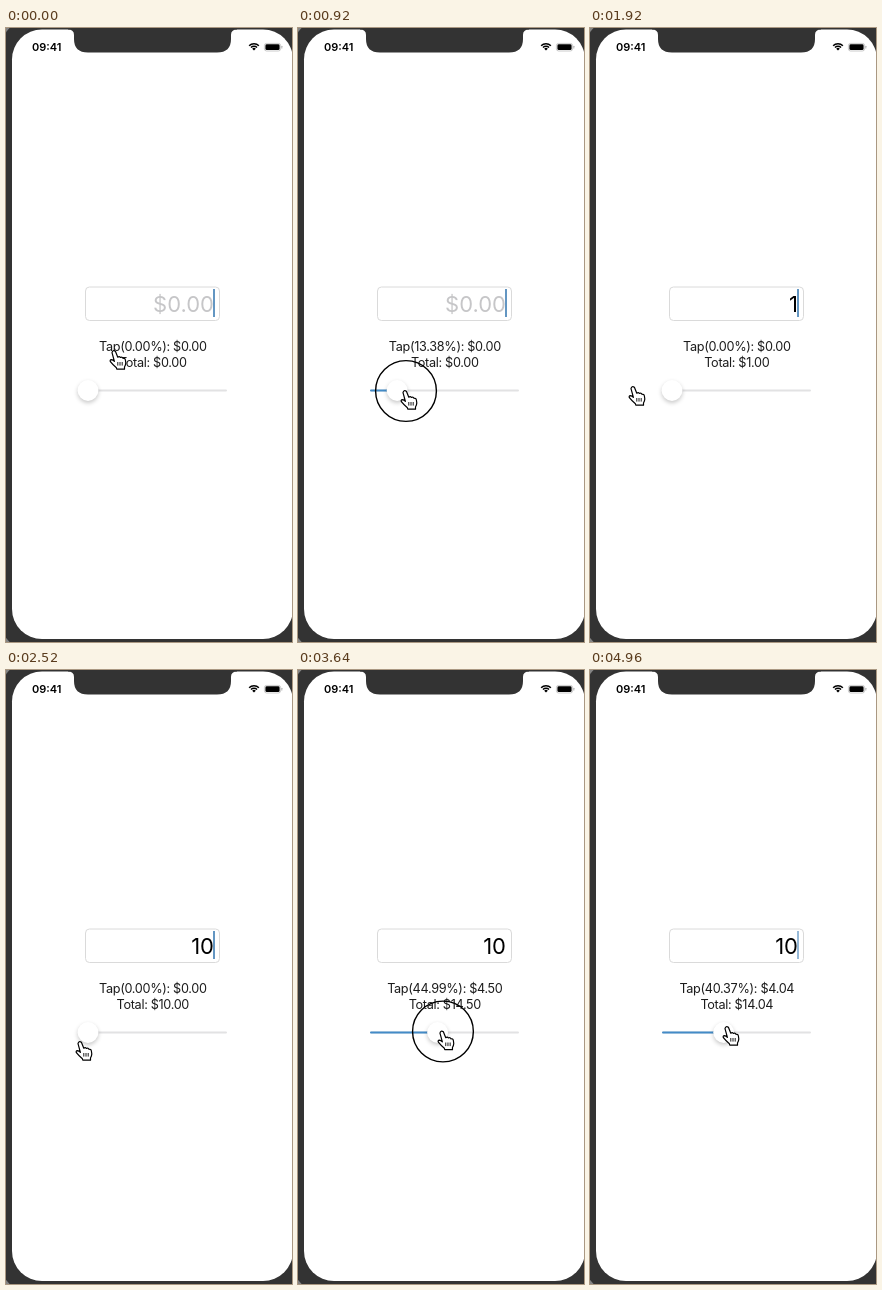
These frames come from a looping animation (286x614 px, 5 s). An HTML page with a canvas:

```html
<!DOCTYPE html>
<html lang="en">
<head>
<meta charset="utf-8">
<title>Tip slider</title>
<style>
html, body { margin: 0; width: 100%; height: 100%; overflow: hidden; background: #fff; }
canvas { display: block; }
</style>
</head>
<body>
<canvas id="stage" width="286" height="614"></canvas>
<script>
const ctx = document.getElementById('stage').getContext('2d');
const LOOP = 5000, STEP = 40;
const FONT = 'Inter, "Liberation Sans", sans-serif';
const BLUE = '#438bc7';
const TRACK = { left: 72, right: 221, y: 362.5, start: 82, travel: 128 };

// Pointer hotspot: time, x, y
const pointerPath = [
  [0, 109, 323], [120, 104, 334], [260, 94, 357], [360, 91, 364], [520, 91, 363],
  [640, 103, 363], [800, 117, 363], [920, 108, 363], [1120, 75, 361.5], [1280, 44, 359.5],
  [1320, 44, 359], [2360, 44, 359], [2520, 75, 372], [2640, 84, 368], [2920, 86, 365.5],
  [3040, 86, 365.5], [3200, 105.5, 364.5], [3640, 144.96, 361.5], [3840, 152.5, 361],
  [4120, 147, 360], [4400, 139.05, 358], [4480, 139.05, 357.5], [4600, 138, 357]
];
const presses = [
  { from: 400, to: 1300, grip: 90.872 },
  { from: 2760, to: 4520, grip: 87.375 }
];

const clamp = (v, lo, hi) => Math.min(hi, Math.max(lo, v));

function pointerAt(t) {
  const i = pointerPath.findIndex(k => k[0] > t);
  if (i < 0) return pointerPath[pointerPath.length - 1].slice(1);
  const [t0, x0, y0] = pointerPath[i - 1], [t1, x1, y1] = pointerPath[i];
  const u = (t - t0) / (t1 - t0);
  return [x0 + (x1 - x0) * u, y0 + (y1 - y0) * u];
}

function percentAt(t) {
  const last = presses[1];
  const press = t >= last.from ? last : presses.find(p => t >= p.from && t < p.to);
  if (!press) return 0;
  const [x] = pointerAt(Math.min(t, press.to - STEP));
  return clamp((x - press.grip) / TRACK.travel * 100, 0, 100);
}

// The caret blinks every 920 ms; typing keeps it lit.
function caretAlpha(t) {
  if (t >= 1880 && t < 2560) return 1;
  const start = t < 1880 ? -400 : 2160;
  const p = (t - start) % 920;
  return p < 440 ? clamp((p + 40) / 120, 0, 1) : clamp((560 - p) / 120, 0, 1);
}

function box(x, y, w, h, r, fill) {
  ctx.beginPath();
  ctx.roundRect(x, y, w, h, r);
  ctx.fillStyle = fill;
  ctx.fill();
}

function text(str, x, y, size, { weight = 400, color = '#1c1c1c', align = 'center', spacing = 0 } = {}) {
  ctx.font = `${weight} ${size}px ${FONT}`;
  ctx.letterSpacing = spacing + 'px';
  ctx.textAlign = align;
  ctx.fillStyle = color;
  ctx.fillText(str, x, y);
}

function drawPhone() {
  ctx.fillStyle = '#858585';
  ctx.fillRect(0, 0, 286, 614);
  box(-9.5, -13.5, 340, 641, 45.5, '#333');
  box(6, 1.5, 281, 609.5, 30, '#fff');

  ctx.fillStyle = '#333';
  ctx.fill(new Path2D('M62 0H231V1.5Q225 1.5 225 7V11Q225 24.5 211 24.5H82Q68 24.5 68 11V7Q68 1.5 62 1.5Z'));

  text('09:41', 26, 23, 11, { weight: 600, color: '#000', align: 'left' });
  drawWifi(248, 22.6);
  ctx.strokeStyle = '#aaa';
  ctx.lineWidth = 0.6;
  ctx.beginPath();
  ctx.roundRect(258.4, 15.4, 16.2, 7.6, 2.2);
  ctx.stroke();
  box(259.4, 16.3, 14.2, 5.8, 1.4, '#000');
  box(275.4, 17.8, 0.9, 2.8, 0.4, '#aaa');
}

function drawWifi(x, y) {
  const from = -Math.PI * 0.75, to = -Math.PI * 0.25;
  ctx.strokeStyle = ctx.fillStyle = '#000';
  ctx.lineWidth = 1.5;
  for (const r of [4.3, 6.9]) {
    ctx.beginPath();
    ctx.arc(x, y, r, from, to);
    ctx.stroke();
  }
  ctx.beginPath();
  ctx.moveTo(x, y);
  ctx.arc(x, y, 2.6, from, to);
  ctx.fill();
}

function drawField(t) {
  ctx.strokeStyle = '#dadada';
  ctx.lineWidth = 1;
  ctx.beginPath();
  ctx.roundRect(79.5, 259, 134, 33.5, 4);
  ctx.stroke();

  const typed = t < 1880 ? '' : t < 2080 ? '1' : '10';
  text(typed || '$0.00', 208, 284, 22, { color: typed ? '#000' : '#c6c6c8', align: 'right' });
  ctx.globalAlpha = caretAlpha(t);
  ctx.fillStyle = '#3d7db4';
  ctx.fillRect(207.2, 261, 1.6, 28);
  ctx.globalAlpha = 1;
}

function drawLabels(t, percent) {
  const amount = t < 1920 ? 0 : t < 2120 ? 1 : 10;
  const tip = amount * percent / 100;
  const style = { spacing: -0.33 };
  text(`Tap(${percent.toFixed(2)}%): $${tip.toFixed(2)}`, 146.8, 323.2, 12.7, style);
  text(`Total: $${(amount + tip).toFixed(2)}`, 146.8, 338.5, 12.7, style);
}

function drawSlider(percent) {
  const { left, right, y, start, travel } = TRACK;
  const x = start + travel * percent / 100;
  box(left, y - 1, right - left, 2, 1, '#e2e2e3');
  if (percent > 0) box(left, y - 1, x - left, 2, 1, BLUE);
  ctx.save();
  ctx.shadowColor = 'rgba(0,0,0,.22)';
  ctx.shadowBlur = 4;
  ctx.shadowOffsetY = 2;
  ctx.beginPath();
  ctx.arc(x, y, 10.4, 0, Math.PI * 2);
  ctx.fillStyle = '#fff';
  ctx.fill();
  ctx.restore();
}

const hand = new Path2D('M-3 1.6Q-2.2-1.4 .4 .3L2.8 6.2Q4.3 5 5.5 6.5Q7.2 5.6 8.1 7.4Q10 6.8 10.4 9' +
  'L10.8 12Q10.7 14 9.5 16V18.2H1.8L1.4 16.8Q-2 14-4.6 10.7Q-5.4 8.7-3.6 8.6Q-2 8.8-.6 10.3Z');
const fingers = new Path2D('M2.8 11V14.6M5 11V14.6M7.2 11V14.6');

function drawPointer(t) {
  const [x, y] = pointerAt(t);
  ctx.save();
  ctx.translate(x, y);
  ctx.strokeStyle = '#000';
  if (presses.some(p => t >= p.from && t < p.to)) {
    ctx.lineWidth = 1.4;
    ctx.beginPath();
    ctx.arc(0, 0, 30.4, 0, Math.PI * 2);
    ctx.stroke();
  }
  ctx.lineJoin = 'round';
  ctx.lineWidth = 1.2;
  ctx.fillStyle = '#fff';
  ctx.fill(hand);
  ctx.stroke(hand);
  ctx.lineWidth = 0.9;
  ctx.stroke(fingers);
  ctx.restore();
}

function frame(now) {
  const t = Math.floor(now % LOOP / STEP) * STEP;
  const percent = percentAt(t);
  drawPhone();
  drawField(t);
  drawLabels(t, percent);
  drawSlider(percent);
  drawPointer(t);
  requestAnimationFrame(frame);
}
requestAnimationFrame(frame);
</script>
</body>
</html>
```
